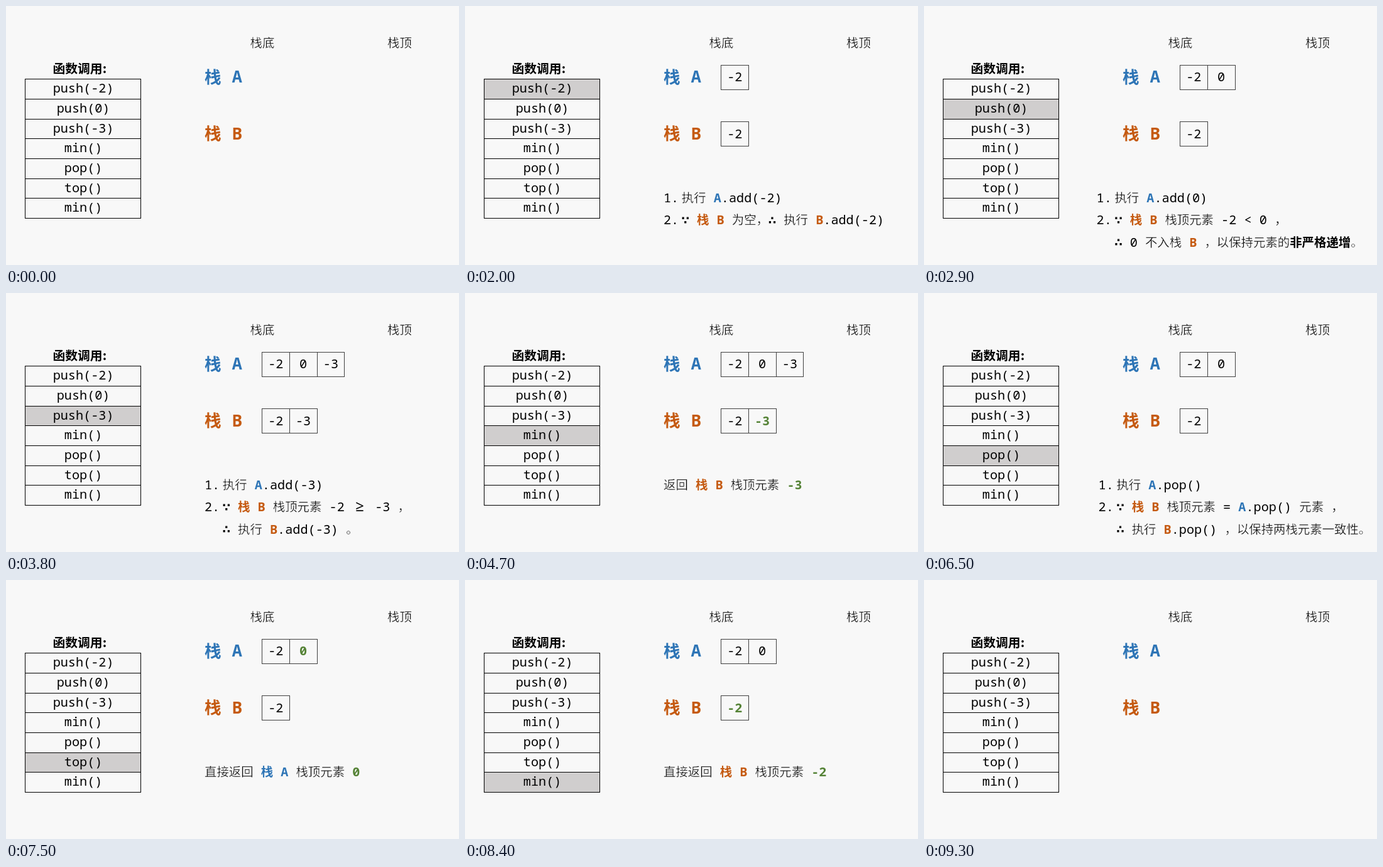
An HTML page for the animation above (9.7 s loop, 721 by 413 pixels).

```html
<!DOCTYPE html>
<html lang="zh-CN">
<head>
<meta charset="utf-8">
<title>最小栈</title>
<style>
html, body { margin: 0; width: 100%; height: 100%; overflow: hidden; background: #f8f8f8; }
svg { display: block; }
text { white-space: pre; }
.mono { font-family: "Noto Sans Mono", "DejaVu Sans Mono", monospace; }
/* A thin outline in the background colour gives the light weight. */
.cjk { font-family: "Noto Sans CJK SC", "Noto Sans CJK", sans-serif; font-weight: 300; stroke: #f8f8f8; stroke-width: 0.4; }
.sign { font-family: "DejaVu Sans", sans-serif; font-weight: 700; text-anchor: middle; }
.mid { text-anchor: middle; }
.a, .b, .g, .k { font-weight: 700; stroke: none; }
.a { fill: #2e75b6; }
.b { fill: #c55a11; }
.g { fill: #548235; }
.heavy { font-weight: 900; stroke: none; }
.row, .cell { fill: none; stroke-width: 1; shape-rendering: crispEdges; }
.row { stroke: #000; }
.cell { stroke: #404040; }
.lit { fill: #d0cece; shape-rendering: crispEdges; }
</style>
</head>
<body>
<svg id="stage" width="721" height="413" viewBox="0 0 721 413"></svg>
<script>
const stage = document.getElementById('stage');
const MONO = 20.2, CELL = MONO * 0.6, HAN = 19.4, INDENT = 28.8;
const TABLE = { x: 30.5, y: 116.9, w: 184, h: 31.65 };
const BOX = { x: 407.4, w: 43.8, h: 39 };
const LINES = [313, 348, 383.6];
const LOOP = 9700;
const CALLS = ['push(-2)', 'push(0)', 'push(-3)', 'min()', 'pop()', 'top()', 'min()'];

// Markup: {a…} blue, {b…} orange, {g…} green, {k…} bold.
// "lead" is the left edge of the notes; ">" marks a continued line.
const STEPS = [
  { at: 0 },
  { at: 2000, call: 0, A: ['-2'], B: ['-2'], lead: 316,
    notes: ['1.执行 {aA}.add(-2)', '2.∵ {b栈 B} 为空，∴ 执行 {bB}.add(-2)'] },
  { at: 2900, call: 1, A: ['-2', '0'], B: ['-2'], lead: 274.6,
    notes: ['1.执行 {aA}.add(0)', '2.∵ {b栈 B} 栈顶元素 -2 < 0 ，',
      '>∴ 0 不入栈 {bB} ，以保持元素的{k非严格递增}。'] },
  { at: 3800, call: 2, A: ['-2', '0', '-3'], B: ['-2', '-3'], lead: 316,
    notes: ['1.执行 {aA}.add(-3)', '2.∵ {b栈 B} 栈顶元素 -2 ≥ -3 ，',
      '>∴ 执行 {bB}.add(-3) 。'] },
  { at: 4700, call: 3, A: ['-2', '0', '-3'], B: ['-2', '{g-3}'], lead: 316,
    notes: ['返回 {b栈 B} 栈顶元素 {g-3}'] },
  { at: 5600, call: 4, A: ['-2', '0'], B: ['-2', '-3'], lead: 277.6,
    notes: ['1.执行 {aA}.pop()'] },
  { at: 6500, call: 4, A: ['-2', '0'], B: ['-2'], lead: 277.6,
    notes: ['1.执行 {aA}.pop()', '2.∵ {b栈 B} 栈顶元素 = {aA}.pop() 元素 ，',
      '>∴ 执行 {bB}.pop() ，以保持两栈元素一致性。'] },
  { at: 7500, call: 5, A: ['-2', '{g0}'], B: ['-2'], lead: 316,
    notes: ['直接返回 {a栈 A} 栈顶元素 {g0}'] },
  { at: 8400, call: 6, A: ['-2', '0'], B: ['{g-2}'], lead: 316,
    notes: ['直接返回 {b栈 B} 栈顶元素 {g-2}'] },
  { at: 9300 }
];

const snap = v => Math.floor(v) + 0.5;

function add(parent, tag, attrs, content) {
  const el = document.createElementNS('http://www.w3.org/2000/svg', tag);
  for (const key in attrs) el.setAttribute(key, attrs[key]);
  if (content) el.textContent = content;
  parent.appendChild(el);
  return el;
}

function label(parent, x, y, content, size, cls) {
  add(parent, 'text', { x, y, 'font-size': size, class: cls }, content);
}

// A rectangle whose edges sit on pixel centres, so neighbours share one line.
function box(parent, x, y, w, h, cls) {
  const left = snap(x), top = snap(y);
  add(parent, 'rect', { x: left, y: top, width: snap(x + w) - left, height: snap(y + h) - top, class: cls });
}

// Sets one run on the mixed Han / monospace grid and returns its right edge.
function run(parent, x, y, content, tone) {
  const parts = content.match(/[\u3001-\u9fff\uff0c]+|≥|[∵∴]| +|[\x21-\x7e]+/g) || [];
  for (const part of parts) {
    if (part === '≥') {
      label(parent, x + CELL, y, part, 24, 'mono mid');
      x += CELL * 2;
    } else if (/[∵∴]/.test(part)) {
      label(parent, x + CELL / 2, y - 0.5, part, 18, 'sign');
      x += CELL;
    } else if (part[0] > '\u3000') {
      label(parent, x, y, part, HAN, 'cjk ' + tone);
      x += HAN * part.length;
    } else {
      if (part.trim()) label(parent, x, y, part, MONO, 'mono ' + tone);
      x += CELL * part.length;
    }
  }
  return x;
}

function rich(parent, x, y, source) {
  for (const [, tone, toned, plain] of source.matchAll(/\{(\w)(.*?)\}|([^{]+)/g)) {
    x = run(parent, x, y, toned || plain, tone || '');
  }
}

function note(parent, x, y, source) {
  const number = source.match(/^\d\./);
  if (number) {
    run(parent, x, y, number[0], '');
    rich(parent, x + INDENT, y, source.slice(2));
  } else if (source[0] === '>') {
    rich(parent, x + INDENT, y, source.slice(1));
  } else {
    rich(parent, x, y, source);
  }
}

function stack(parent, items, top) {
  items.forEach((item, i) => {
    const x = BOX.x + i * BOX.w;
    const width = item.replace(/\{\w|\}/g, '').length * CELL;
    box(parent, x, top, BOX.w, BOX.h, 'cell');
    rich(parent, x + (BOX.w - width) / 2, top + 25.9, item);
  });
}

function rowBox(parent, i, cls) {
  box(parent, TABLE.x, TABLE.y + i * TABLE.h, TABLE.w, TABLE.h, cls);
}

const scenes = STEPS.map(step => {
  const group = add(stage, 'g', { visibility: 'hidden' });
  if (step.call !== undefined) {
    rowBox(group, step.call, 'lit');
    stack(group, step.A, 94.5);
    stack(group, step.B, 184.9);
    step.notes.forEach((source, i) => note(group, step.lead, LINES[i], source));
  }
  return group;
});

CALLS.forEach((call, i) => {
  rowBox(stage, i, 'row');
  label(stage, TABLE.x + TABLE.w / 2 + 0.6, TABLE.y + i * TABLE.h + 21.4, call, MONO, 'mono mid');
});
label(stage, 74.5, 107.3, '函数调用:', 19.8, 'cjk heavy');
label(stage, 388.5, 65.8, '栈底', HAN, 'cjk');
label(stage, 607, 65.8, '栈顶', HAN, 'cjk');
[['A', 122.3, 'a'], ['B', 212.8, 'b']].forEach(([name, y, tone]) => {
  label(stage, 316, y + 0.5, '栈', 26.5, 'cjk ' + tone);
  label(stage, 359.5, y, name, 27.5, 'mono ' + tone);
});

const start = performance.now();
let shown = -1;
function draw() {
  const t = (performance.now() - start) % LOOP;
  const now = STEPS.filter(step => step.at <= t).length - 1;
  if (now !== shown) {
    scenes.forEach((scene, i) => scene.setAttribute('visibility', i === now ? 'visible' : 'hidden'));
    shown = now;
  }
  requestAnimationFrame(draw);
}
draw();
</script>
</body>
</html>
```
